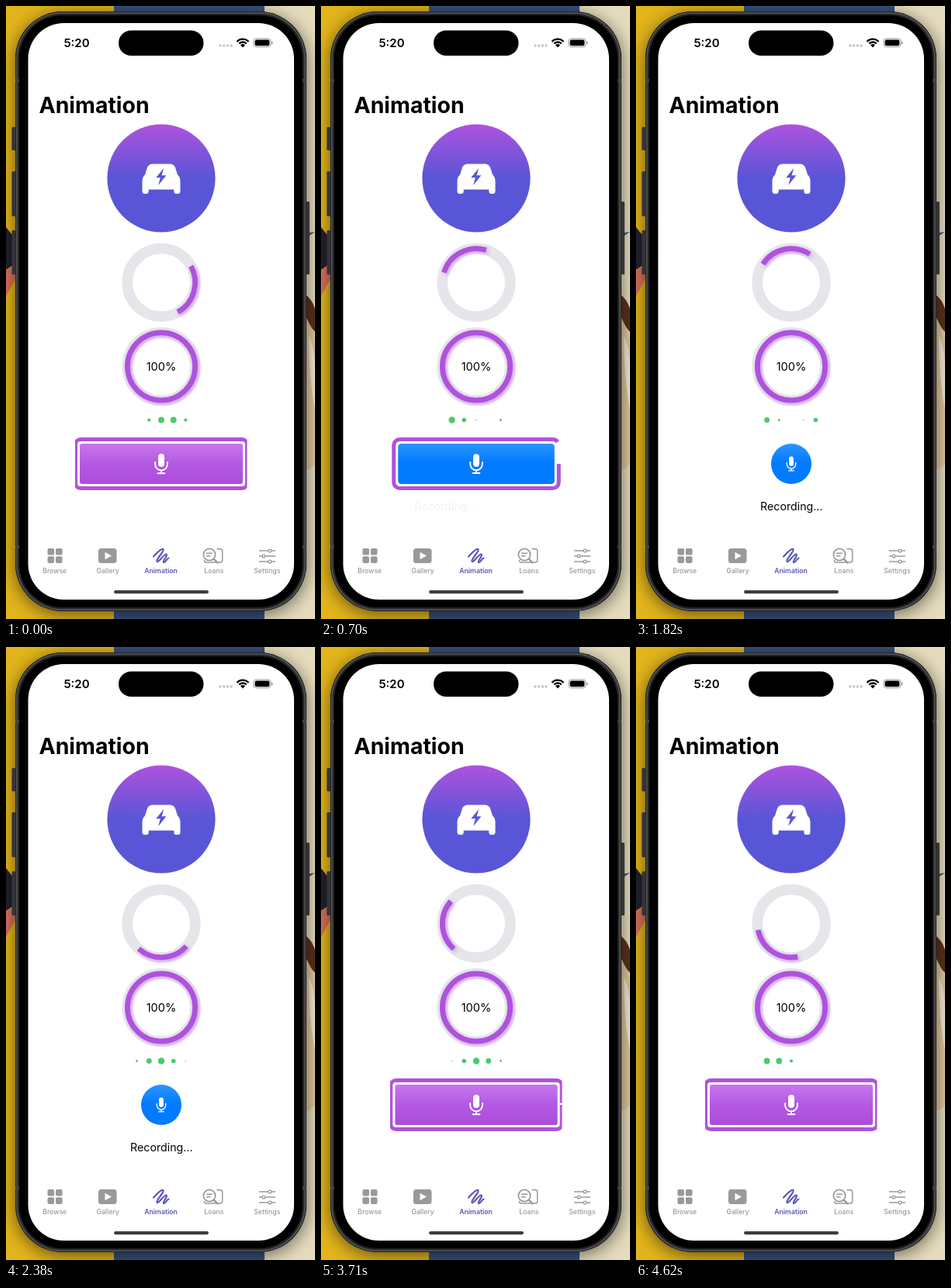
Recreate the animation shown at these times as an HTML page with a canvas. Size 398x790 px, loop 4.69 s.

```html
<!DOCTYPE html>
<html lang="en">
<head>
<meta charset="utf-8">
<title>Animation</title>
<style>
html, body { margin: 0; width: 100%; height: 100%; overflow: hidden; }
canvas { display: block; width: 398px; height: 790px; }
</style>
</head>
<body>
<canvas id="stage" width="398" height="790"></canvas>
<script>
const ctx = document.getElementById('stage').getContext('2d');
const LOOP = 4690, STEP = 70;
const PURPLE = '#af52de', INDIGO = '#5856d6', TRACK = '#e5e5ea', GRAY = '#999999';
const TAB_ACTIVE = '#5c57b4';
const RECORD_AT = 666, STOP_AT = 3019;
const SPIN = [[0, -29], [700, 197], [1260, 384], [2380, 762], [3150, 1031], [3710, 1211.5], [4620, 1519]];

function box(x, y, w, h, r, fill) {
  ctx.beginPath();
  ctx.roundRect(x, y, w, h, r);
  ctx.fillStyle = fill;
  ctx.fill();
}

function disc(x, y, r, fill) {
  ctx.beginPath();
  ctx.arc(x, y, r, 0, Math.PI * 2);
  ctx.fillStyle = fill;
  ctx.fill();
}

function shape(d, fill) {
  ctx.fillStyle = fill;
  ctx.fill(new Path2D(d));
}

function line(d, color, width, cap = 'round') {
  ctx.strokeStyle = color;
  ctx.lineWidth = width;
  ctx.lineCap = cap;
  ctx.lineJoin = 'round';
  ctx.stroke(new Path2D(d));
}

function ring(x, y, r, width, color, from = 0, to = Math.PI * 2) {
  ctx.beginPath();
  ctx.arc(x, y, r, from, to);
  ctx.strokeStyle = color;
  ctx.lineWidth = width;
  ctx.lineCap = 'butt';
  ctx.stroke();
}

function text(str, x, y, size, weight, color, align = 'center') {
  ctx.font = `${weight} ${size}px Inter, sans-serif`;
  ctx.textAlign = align;
  ctx.fillStyle = color;
  ctx.fillText(str, x, y);
}

function vertical(y0, y1, ...colors) {
  const g = ctx.createLinearGradient(0, y0, 0, y1);
  colors.forEach((c, i) => g.addColorStop(i / (colors.length - 1), c));
  return g;
}

function withShadow(color, blur, dx, dy, draw) {
  ctx.save();
  ctx.shadowColor = color;
  ctx.shadowBlur = blur;
  ctx.shadowOffsetX = dx;
  ctx.shadowOffsetY = dy;
  draw();
  ctx.restore();
}

function wallpaper() {
  box(0, 0, 139, 790, 0, '#e3b51b');
  box(139, 0, 194, 790, 0, '#35527f');
  box(333, 0, 65, 790, 0, '#e6dcbd');
  shape('M0 285L12 300V332L0 340Z', '#20212a');
  shape('M0 340L12 334V352L0 374Z', '#d9705c');
  shape('M386 293L398 291L386 299Z', '#35527f');
  shape('M386 372Q394 378 398 390V420Q390 412 386 400Z', '#5b301c');
  shape('M386 400L398 424V590Q390 600 386 596Z', '#e2c79c');
  shape('M390 425Q398 440 398 470V520Q390 480 390 425Z', '#f4ead6');
}

function phone() {
  withShadow('rgba(0,0,0,.55)', 22, 0, 4, () => box(12, 7, 375, 773, 61, '#222'));
  for (const [y, h] of [[156, 30], [213, 58], [289, 57]]) box(7.5, y, 5, h, 1.5, '#34343a');
  box(386.5, 252, 4.5, 94, 1.5, '#34343a');
  box(12, 7, 375, 773, 61, '#252527');
  ctx.beginPath();
  ctx.roundRect(14, 9, 371, 769, 59);
  ctx.strokeStyle = '#58585a';
  ctx.lineWidth = 1.5;
  ctx.stroke();
  for (const y of [94, 695]) {
    box(12, y, 5, 4, 0, '#444');
    box(382, y, 5, 4, 0, '#444');
  }
  box(17, 12, 365, 763, 56, '#000');
  box(28.5, 22, 342.5, 743, 46, '#fff');
  box(145, 31.5, 109.5, 32.5, 16.25, '#000');
}

function statusBar() {
  text('5:20', 91, 53, 15, 600, '#000');
  for (let i = 0; i < 4; i++) disc(276 + i * 4.7, 51, 1.7, '#c4c4c6');
  for (const [r, w] of [[10.3, 2.3], [6.5, 2.3]]) {
    ring(305, 53, r, w, '#000', -Math.PI * 0.76, -Math.PI * 0.24);
  }
  shape('M305 53.4L302 50.2Q305 47.9 308 50.2Z', '#000');
  ctx.beginPath();
  ctx.roundRect(319, 42, 22, 10.8, 3.4);
  ctx.strokeStyle = '#999';
  ctx.lineWidth = 1;
  ctx.stroke();
  box(320.6, 43.6, 18.8, 7.6, 2, '#000');
  box(342, 45.5, 1.4, 4, 0.7, '#999');
}

function carBadge() {
  disc(200, 222, 69.6, vertical(152, 292, PURPLE, INDIGO, INDIGO));
  shape('M189 203.5H211Q216 203.5 218 208L221 217.5Q224.5 220 224.5 226V238.5Q224.5 242 221 242' +
    'H219.5Q216.3 242 216.3 238.5V236.5H183.7V238.5Q183.7 242 180.5 242H179Q175.5 242 175.5 238.5' +
    'V226Q175.5 220 179 217.5L182 208Q184 203.5 189 203.5Z', '#fff');
  shape('M203.2 209L193.2 221.3H198.8L196.2 231L206.4 218.3H200.6Z', INDIGO);
}

function spinAngle(t) {
  let i = 0;
  while (i < SPIN.length - 2 && t > SPIN[i + 1][0]) i++;
  const [t0, a0] = SPIN[i], [t1, a1] = SPIN[i + 1];
  return (a0 + (a1 - a0) * (t - t0) / (t1 - t0)) * Math.PI / 180;
}

function purpleArc(y, from, to) {
  withShadow('rgba(190,90,235,.4)', 4, 2.5, 2.5, () => ring(200, y, 43.6, 6.8, PURPLE, from, to));
}

function loaders(t) {
  ring(200, 356.3, 43.8, 13.6, TRACK);
  const a = spinAngle(t);
  purpleArc(356.3, a, a + Math.PI / 2);
  ring(200, 464.5, 43.8, 13.6, TRACK);
  purpleArc(464.5, 0, Math.PI * 2);
  text('100%', 200, 470, 14.6, 400, '#000');
}

function dots(t) {
  for (let i = 0; i < 5; i++) {
    const phase = t / 1260 - 0.583 - i / 6;
    const r = 2.1 * (1 + Math.cos(phase * Math.PI * 2));
    if (r > 0.05) disc(168.6 + i * 15.7, 533.5, r, '#4bc96c');
  }
}

// Critically damped spring, 0 to 1.
function spring(ms) {
  const x = Math.max(0, ms) * 0.0109;
  return 1 - (1 + x) * Math.exp(-x);
}

function mic(scale) {
  ctx.save();
  ctx.translate(200, 590);
  ctx.scale(scale, scale);
  box(-4, -13, 8, 17, 4, '#fff');
  line('M-7.9 -2V0.5A7.9 7.9 0 0 0 7.9 0.5V-2M0 8.5V12M-4.5 12.2H4.5', '#fff', 1.9);
  ctx.restore();
}

// Outline starting at the middle of the right side, running clockwise.
function trimmedOutline(w, h, r, part) {
  const right = 200 + w / 2, left = 200 - w / 2, top = 590 - h / 2, bottom = 590 + h / 2;
  const length = 2 * (w + h) - 8 * r + 2 * Math.PI * r;
  ctx.beginPath();
  ctx.moveTo(right, 590);
  ctx.arcTo(right, bottom, left, bottom, r);
  ctx.arcTo(left, bottom, left, top, r);
  ctx.arcTo(left, top, right, top, r);
  ctx.arcTo(right, top, right, 590, r);
  ctx.closePath();
  if (part < 0.999) ctx.setLineDash([length * part, length]);
  ctx.strokeStyle = PURPLE;
  ctx.lineWidth = 5;
  ctx.lineCap = 'butt';
  ctx.stroke();
}

function recorder(t) {
  const recording = t >= RECORD_AT && t < STOP_AT;
  const open = t < STOP_AT ? 1 - spring(t - RECORD_AT) : spring(t - STOP_AT);
  const w = 52 + 158 * open;
  const r = 26 - 23 * open;

  ctx.save();
  ctx.beginPath();
  ctx.roundRect(89, 550, 221.5, 80, 0);
  ctx.clip();
  if (open > 0.012) trimmedOutline(w + 11, 63, r + 3.5, open);
  ctx.restore();

  const fill = recording
    ? vertical(564, 616, '#2c94ff', '#007aff', '#007aff')
    : vertical(564, 616, '#c877ee', '#b458e2', '#ab4ddc');
  box(200 - w / 2, 564, w, 52, r, fill);
  mic(recording ? 0.73 + 0.27 * open : 1);

  if (open < 0.995) {
    ctx.globalAlpha = 1 - open;
    text('Recording...', 200.3 - 42 * open, 650, 14.2, 400, '#000');
    ctx.globalAlpha = 1;
  }
}

function tabBar() {
  for (const x of [53.5, 64]) for (const y of [699, 709.3]) box(x, y, 8.6, 8.6, 1.8, GRAY);

  box(119, 699, 23.5, 19, 3.5, GRAY);
  shape('M127.5 703.8L136 708.5L127.5 713.2Z', '#fff');

  line('M190 709.5C195 704 200 699 202.5 700C205 702 192 714 194.5 716C197 717.5 203 706 206.5 706.5' +
    'C209 708 201 715.5 203 717C205 718 207 712 209.5 711.5', TAB_ACTIVE, 2.2);

  line('M272 699.8H276Q278.7 699.8 278.7 702.5V714.3Q278.7 717 276 717H257.5Q255.5 717 255.5 714.5', GRAY, 1.5);
  disc(262, 707, 9.2, '#fff');
  ring(262, 707, 7.7, 1.7, GRAY);
  line('M267.7 712.7L272.5 717.5', GRAY, 2.4);
  line('M258.5 705.3H265.5M258.5 708.8H263', GRAY, 1.5);

  for (const [y, x] of [[702, 340], [709, 332], [716, 340]]) {
    line(`M326.5 ${y}H346.5`, GRAY, 1.5);
    disc(x, y, 2.5, '#fff');
    ring(x, y, 1.9, 1.4, GRAY);
  }

  const labels = ['Browse', 'Gallery', 'Animation', 'Loans', 'Settings'];
  labels.forEach((label, i) => {
    const active = i === 2;
    text(label, 62.7 + i * 68.4, 731.3, 8.7, active ? 600 : 500, active ? TAB_ACTIVE : GRAY);
  });
  box(139, 753, 122, 4.2, 2.1, '#3d3d3f');
}

function draw(t) {
  wallpaper();
  phone();
  statusBar();
  text('Animation', 42.5, 138.3, 28.4, 700, '#000', 'left');
  carBadge();
  loaders(t);
  dots(t);
  recorder(t);
  tabBar();
}

const start = performance.now();
function frame() {
  const t = (performance.now() - start) % LOOP;
  draw(Math.floor(t / STEP) * STEP);
  requestAnimationFrame(frame);
}
frame();
</script>
</body>
</html>
```
